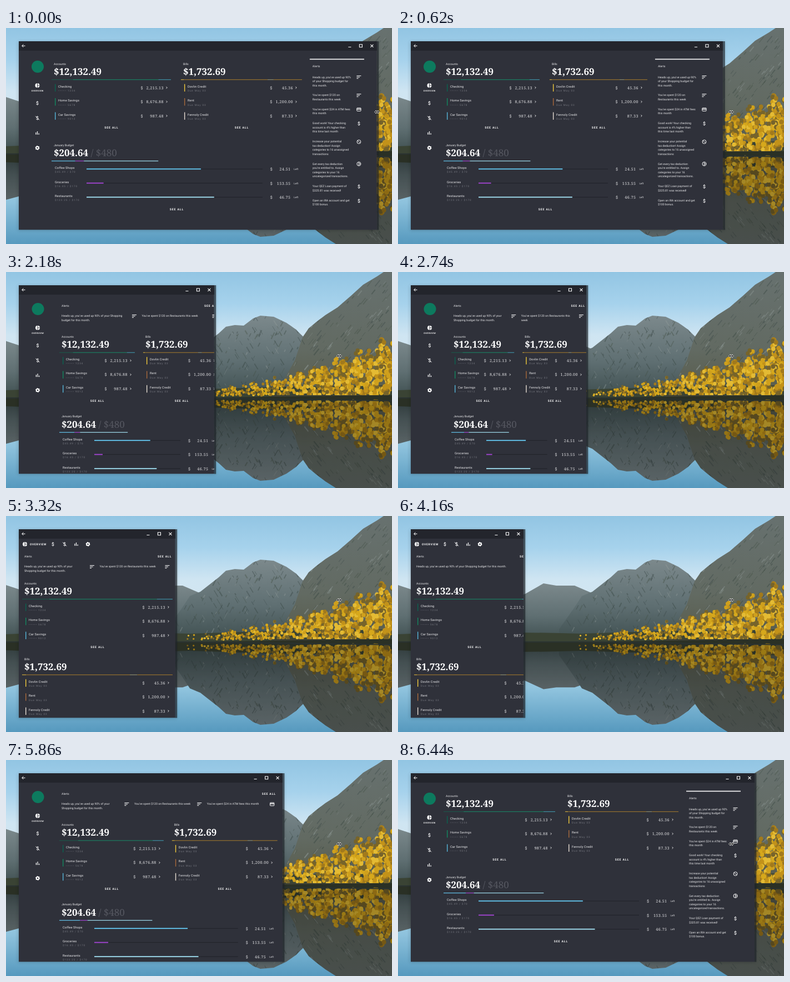
Write an HTML page that moves like this. It is 695 px wide and 391 px high and loops after 6460 ms.

```html
<!DOCTYPE html>
<html lang="en">
<head>
<meta charset="utf-8">
<title>Responsive finance dashboard</title>
<style>
html, body { margin: 0; width: 100%; height: 100%; overflow: hidden; background: #8fbfd9; }
svg { display: block; width: 695px; height: 391px; }
text { font-family: Roboto, "Open Sans", sans-serif; text-rendering: geometricPrecision; white-space: pre; }
.serif { font-family: "Noto Serif", "Liberation Serif", serif; }
.mirrored { filter: brightness(.72); }
</style>
</head>
<body>
<svg viewBox="0 0 695 391" xmlns="http://www.w3.org/2000/svg">
  <defs>
    <linearGradient id="sky" x1="0" y1="0" x2="0" y2="1">
      <stop offset="0" stop-color="#92c5e3"/><stop offset=".25" stop-color="#a6d2ec"/><stop offset=".5" stop-color="#cfe5f2"/><stop offset="1" stop-color="#d9e8ef"/>
    </linearGradient>
    <linearGradient id="water" x1="0" y1="0" x2="0" y2="1">
      <stop offset="0" stop-color="#98bccb"/><stop offset=".5" stop-color="#92c5df"/><stop offset="1" stop-color="#5699be"/>
    </linearGradient>
    <linearGradient id="rock" x1="0" y1="0" x2="0" y2="1">
      <stop offset="0" stop-color="#7c898c"/><stop offset=".55" stop-color="#5f6f72"/><stop offset="1" stop-color="#3d4d4e"/>
    </linearGradient>
    <linearGradient id="slope" x1="0" y1="0" x2="0" y2="1">
      <stop offset="0" stop-color="#67716f"/><stop offset=".6" stop-color="#626a62"/><stop offset="1" stop-color="#565948"/>
    </linearGradient>
    <filter id="blur" x="-20%" y="-20%" width="140%" height="140%"><feGaussianBlur stdDeviation="3"/></filter>
    <clipPath id="frame"><rect id="frameRect" x="23" y="24" width="10" height="341.5"/></clipPath>
    <clipPath id="land"><path id="landShape"/></clipPath>
  </defs>
  <rect width="695" height="229" fill="url(#sky)"/>
  <rect y="228" width="695" height="163" fill="url(#water)"/>
  <g id="far"></g>
  <use class="mirrored" href="#far" transform="matrix(1 0 0 -.8 0 411)"/>
  <g id="near"></g>
  <use class="mirrored" href="#near" transform="matrix(1 0 0 -1 0 457)"/>
  <path d="M0 228H330L695 233" stroke="#2a3231" stroke-width="2" fill="none"/>
  <rect id="shadow" x="22" y="25" height="341" fill="#000" opacity=".18" filter="url(#blur)"/>
  <g id="app"></g>
  <g id="cursor">
    <path d="M-4.5 0L-1.5-3V-1H1.5V-3L4.5 0L1.5 3V1H-1.5V3Z" fill="#222" stroke="#eee" stroke-width=".8"/>
  </g>
</svg>
<script>
const LOOP = 6460;
const BG = '#2f313a';
const $ = id => document.getElementById(id);

// Positions of the close button, and of the same point in the lagging content
const FRAME_KEYS = [[0, 659], [1320, 483], [2180, 366], [3320, 296], [4160, 217], [4400, 208], [5260, 352], [6440, 633]];
const CONTENT_KEYS = [[0, 659], [1320, 483], [2180, 382], [3320, 296], [4160, 242], [4420, 210], [5260, 348], [6440, 631]];

// Monotone cubic interpolation
function track(keys) {
  const slope = keys.slice(1).map((k, i) => (k[1] - keys[i][1]) / (k[0] - keys[i][0]));
  const tangent = keys.map((_, i) => {
    const a = slope[i - 1] ?? slope[i], b = slope[i] ?? a;
    return a * b > 0 ? 2 * a * b / (a + b) : 0;
  });
  return t => {
    let i = 0;
    while (i < keys.length - 2 && t > keys[i + 1][0]) i++;
    const [t0, v0] = keys[i], [t1, v1] = keys[i + 1], h = t1 - t0;
    const u = Math.min(1, (t - t0) / h), u2 = u * u, u3 = u2 * u;
    return v0 * (2 * u3 - 3 * u2 + 1) + v1 * (3 * u2 - 2 * u3)
      + h * tangent[i] * (u3 - 2 * u2 + u) + h * tangent[i + 1] * (u3 - u2);
  };
}
const frameAt = track(FRAME_KEYS), contentAt = track(CONTENT_KEYS);

function buildScenery() {
  let seed = 11;
  const rnd = () => (seed = (seed * 16807) % 2147483647) / 2147483647;
  const pick = list => list[Math.floor(rnd() * list.length)];
  const far = 'M0 125L24 133L90 160L180 158L229 141L262 122L285 126L318 126L348 139L380 229H0Z';
  const peak = 'M290 205L318 165L331 145L350 137L383 111L396 99L412 96L428 97L445 84L458 79L482 81L505 92L522 104L536 118L570 150L600 229H290Z';
  const hill = 'M490 215L520 160L534 118L545 102L558 91L575 78L597 64L620 44L643 23L668 8L680 0H695V234H480Z';
  $('far').innerHTML = `<path d="${far}" fill="url(#rock)"/>`;
  $('landShape').setAttribute('d', peak + hill);

  let streaks = '';
  for (let i = 0; i < 520; i++) {
    const x = 300 + rnd() * 395, y = 10 + rnd() * 205, len = 3 + rnd() * 9, lean = x > 540 ? -.8 : pick([-.5, .6]);
    streaks += `<path d="M${x} ${y}l${len * lean} ${len}" stroke="${pick(['#35443f', '#3d4a4a', '#465348', '#939d9b'])}" stroke-width="${.7 + rnd() * 1.5}" opacity=".4"/>`;
  }
  let out = `<path d="${peak}" fill="url(#rock)"/><path d="${hill}" fill="url(#slope)"/>`
    + `<g clip-path="url(#land)">${streaks}</g>`
    + '<path d="M0 214Q150 208 330 213L480 208L695 205V234L330 229H0Z" fill="#3a4334"/>';
  const golds = ['#d6a81c', '#c2921a', '#e4bb34', '#a27a1c', '#cfa01d', '#77642a'];
  for (let i = 0; i < 800; i++) {
    const u = Math.sqrt(rnd()), x = 318 + 380 * u;
    const height = (10 + 112 * u ** 1.7) * (.84 + .16 * Math.sin(x * .23) * Math.cos(x * .07));
    const y = 224 + 5 * u - height * (.08 + .92 * rnd());
    out += `<ellipse cx="${x}" cy="${y}" rx="${1.5 + 2.6 * u}" ry="${1.5 + 3 * u}" fill="${pick(golds)}"/>`;
  }
  $('near').innerHTML = out;
}

// Drawing helpers; y of text is its vertical middle
const text = (x, y, s, size = 5.2, fill = '#e8e8ea', extra = '') =>
  `<text x="${x}" y="${y + size * .36}" font-size="${size}" fill="${fill}" ${extra}>${s}</text>`;
const rect = (x, y, w, h, fill) => `<rect x="${x}" y="${y}" width="${Math.max(0, w)}" height="${h}" fill="${fill}"/>`;
const line = (d, width = 1, color = '#fff') => `<path d="${d}" fill="none" stroke="${color}" stroke-width="${width}"/>`;
const at = (x, y, inner) => `<g transform="translate(${x} ${y})">${inner}</g>`;
const seeAll = (x, y, anchor = 'middle') =>
  text(x, y, 'SEE ALL', 5.1, '#fff', `font-weight="700" letter-spacing=".9" text-anchor="${anchor}"`);
const name = (x, y, s) => text(x, y, s, 5.7, '#e8e8ea', 'letter-spacing=".12"');
const sub = (x, y, s) => text(x, y, s, 4.6, '#777980', 'letter-spacing=".95"');
const money = (x, y, s) => text(x, y, s, 17, '#fff', 'class="serif" font-weight="700"');
const amount = (x, y, s) => text(x, y, s, 7.1, '#e4e4e6', 'class="serif" letter-spacing=".5" text-anchor="end"');
const dollar = (x, y) => text(x, y, '$', 7, '#e4e4e6');

const dollarIcon = text(0, 0, '$', 8.5, '#fff', 'font-weight="500" text-anchor="middle"');
const ICON = {
  pie: `<circle r="4" fill="#fff"/>${line('M0-4.2V4.2M0 0H4.2', .9, BG)}`,
  dollar: dollarIcon,
  off: dollarIcon + line('M-3.4-3.4L3.4 3.4', 1),
  bars: line('M-2.6 3V-1M0 3V-3M2.6 3V.5', 1.2),
  gear: `<circle r="2.3" fill="none" stroke="#fff" stroke-width="1.9"/><circle r="3.4" fill="none" stroke="#fff" stroke-width="1.1" stroke-dasharray="1.8 1.76"/>`,
  sort: line('M-4-2.4H4M-4 0H1.6M-4 2.4H-1', 1),
  card: `<rect x="-3.6" y="-2.8" width="7.2" height="5.6" rx=".6" fill="none" stroke="#fff"/>${line('M-3.6-.8H3.6', 1.5)}`,
  block: `<circle r="3.4" fill="none" stroke="#fff"/>${line('M-2.4-2.4L2.4 2.4')}`,
  ring: `<circle r="3.5" fill="none" stroke="#fff"/>${line('M0-3.5V3.5M0 0H3.5', .9)}`
};
const NAV = ['pie', 'dollar', 'off', 'bars', 'gear'];

const ACCOUNTS = {
  title: 'Accounts', total: '$12,132.49',
  rows: [['Checking', '•••••• 1234', '2,215.13', '#0b6350'], ['Home Savings', '•••••• 5678', '8,676.88', '#12875f'], ['Car Savings', '•••••• 9012', '987.48', '#55b4d8']],
  split: [[.18, '#1d5549'], [.715, '#1c7d60'], [.105, '#3f8fa4']]
};
const BILLS = {
  title: 'Bills', total: '$1,732.69',
  rows: [['Dovlin Credit', 'Due May 03', '45.36', '#f0c93c'], ['Rent', 'Due May 03', '1,200.00', '#a8693c'], ['Fennoly Credit', 'Due May 03', '87.33', '#e6ddd2']],
  split: [[.026, '#c9a53a'], [.69, '#94702f'], [.05, '#8c8a6c'], [.234, '#94702f']]
};
const BUDGET = [
  ['Coffee Shops', '$45.49 / $70', 45.49 / 70, '24.51', '#62c2ea', 45.49],
  ['Groceries', '$16.45 / $170', 16.45 / 170, '153.55', '#a044cf', 16.45],
  ['Restaurants', '$123.25 / $170', 123.25 / 170, '46.75', '#9fdcee', 142.7]
];
// Message, icon, middle of the first line and of the icon in the side panel
const ALERTS = [
  ["Heads up, you've used up 90% of your Shopping budget for this month.", 'sort', 89, 89],
  ["You've spent $120 on Restaurants this week", 'sort', 121.5, 122],
  ["You've spent $24 in ATM fees this month", 'card', 147, 147.5],
  ['Good work! Your checking account is 4% higher than this time last month', 'dollar', 172.5, 173],
  ['Increase your potential tax\u00a0deduction! Assign categories to 16 unassigned transactions', 'block', 205.5, 206],
  ["Get every tax deduction you're entitled to. Assign categories to your 16 uncategorized transactions.", 'ring', 246, 246],
  ['Your QEZ Loan payment of $325.81 was received!', 'dollar', 286.5, 287],
  ['Open an IRA account and get $100 bonus.', 'dollar', 312, 313]
];

function wrap(s, limit) {
  const lines = [''];
  for (const word of s.split(' ')) {
    const last = lines.length - 1, joined = lines[last] ? lines[last] + ' ' + word : word;
    if (joined.length <= limit || !lines[last]) lines[last] = joined;
    else lines.push(word);
  }
  return lines;
}
const paragraph = (x, y, s, limit) => wrap(s, limit).map((l, i) => text(x, y + i * 7.4, l)).join('');

function splitLine(x, y, w, parts) {
  return parts.map(([share, color]) => {
    const bar = rect(x, y - .6, w * share, 1.2, color);
    x += w * share;
    return bar;
  }).join('');
}

function card(data, x, end, y, rowEnd = end) {
  let out = text(x + 4, y, data.title) + money(x + 4, y + 13.5, data.total) + splitLine(x, y + 28.5, end - x, data.split);
  data.rows.forEach(([label, note, value, color], i) => {
    const ry = y + 40.5 + i * 25.5;
    out += rect(x + 6, ry - 4, 1.4, 13.5, color) + name(x + 12, ry, label) + sub(x + 12, ry + 8, note)
      + dollar(rowEnd - 54.5, ry + 2.5) + amount(rowEnd - 13, ry + 2.5, value)
      + line(`M${rowEnd - 8.4} ${ry + .8}l1.7 1.7l-1.7 1.7`, .9);
  });
  return out + seeAll((x + end) / 2 + .5, y + 115.5);
}

function budget(x, end, y) {
  const w = end - x, start = x + 63, full = end - 71 - start;
  let out = text(x + 4, y, 'January Budget')
    + money(x + 4, y + 14.3, '$204.64<tspan fill="#565861" font-weight="400"> / $480</tspan>')
    + splitLine(x, y + 28.7, w, BUDGET.map(b => [b[5] / 480, b[4]]));
  BUDGET.forEach(([label, note, share, left, color], i) => {
    const ry = y + 41 + i * 25.5;
    out += name(x + 6, ry, label) + sub(x + 6, ry + 7.5, note)
      + rect(start, ry + 1.7, full, 1.2, '#22242b') + rect(start, ry + 1.3, full * share, 1.9, color)
      + dollar(end - 57, ry + 2.5) + amount(end - 20.5, ry + 2.5, left) + text(end - 14.5, ry + 2.5, 'Left', 4.5);
  });
  return out + seeAll((x + end) / 2, y + 116);
}

function alertStrip(x, end, y, allX) {
  const w = end - x, count = Math.max(1, Math.floor(w / 120)), cell = w / count;
  let out = text(x + 4, y, 'Alerts') + seeAll(allX, y, 'start');
  for (let i = 0; i < count; i++) {
    const [message, icon] = ALERTS[i];
    out += paragraph(x + 4 + i * cell, y + 18, message, (cell - 27) / 2.43) + at(x + (i + 1) * cell - 9.5, y + 18.5, ICON[icon]);
  }
  return out;
}

function sideNav(x, y) {
  return `<circle cx="${x + .5}" cy="${y - 34}" r="11" fill="#0d7a5e"/>`
    + NAV.map((n, i) => at(x, y + (i ? 5 + i * 27 : 0), ICON[n])).join('')
    + text(x + .2, y + 10, 'OVERVIEW', 3.7, '#fff', 'font-weight="700" letter-spacing=".5" text-anchor="middle"');
}

function wideLayout(c) {
  const x = 82, end = c - 126, mid = x + (end - x) / 2 + 7.5;
  return sideNav(56.5, 104) + card(ACCOUNTS, x, mid - 18, 65) + card(BILLS, mid, end, 65, end - 3) + budget(x, end, 212)
    + rect(c - 112, 55.7, 98, 1.6, '#fff') + text(c - 107, 69, 'Alerts')
    + ALERTS.map(([message, icon, y, iconY]) => paragraph(c - 107, y, message, 28) + at(c - 23.5, iconY, ICON[icon])).join('');
}

function mediumLayout(c) {
  const x = 96, end = c + 3, mid = x + (end - x) / 2 + 6.5;
  return sideNav(57, 101) + alertStrip(x, end, 61.5, c - 25) + card(ACCOUNTS, x, mid - 15, 117.3)
    + card(BILLS, mid, end, 117.3, end - 2.5) + budget(x, end, 261.6);
}

function narrowLayout(c) {
  const x = 29, end = c + 4;
  return NAV.map((n, i) => at(i ? 63.5 + i * 21 : 34, 51, ICON[n])).join('')
    + text(43, 51, 'OVERVIEW', 5, '#fff', 'font-weight="700" letter-spacing=".7"')
    + alertStrip(x, end, 73.5, c - 23) + card(ACCOUNTS, x, end, 122) + card(BILLS, x, end, 259);
}

function titleBar(e) {
  return rect(23, 24, e - 14, 17, '#23252c')
    + line('M34.5 32.3H28.8M31.4 29.6L28.7 32.3L31.4 35', 1)
    + line(`M${e - 42.5} 34.5h5`, 1.1) + line(`M${e - 22.5} 29.8h5v5h-5z`, 1.1)
    + line(`M${e - 2.5} 29.8l5 5m0-5l-5 5`, 1.1);
}

function render(t) {
  const e = frameAt(t), c = contentAt(t), width = e + 9 - 23;
  const layout = c >= 570 ? wideLayout : c >= 320 ? mediumLayout : narrowLayout;
  $('frameRect').setAttribute('width', width);
  $('shadow').setAttribute('width', width + 3);
  $('app').innerHTML = `<rect x="${e + 9}" y="24" width="3.3" height="341.5" fill="#20252c" opacity=".7"/>`
    + `<g clip-path="url(#frame)">${rect(23, 24, width, 341.5, BG)}${layout(c)}${titleBar(e)}</g>`;
  const cursorX = t < 1320 ? Math.max(600, e + 9) : 600;
  $('cursor').setAttribute('transform', `translate(${cursorX} 152)`);
}

buildScenery();
const began = performance.now();
function tick() {
  render((performance.now() - began) % LOOP);
  requestAnimationFrame(tick);
}
tick();
</script>
</body>
</html>
```
